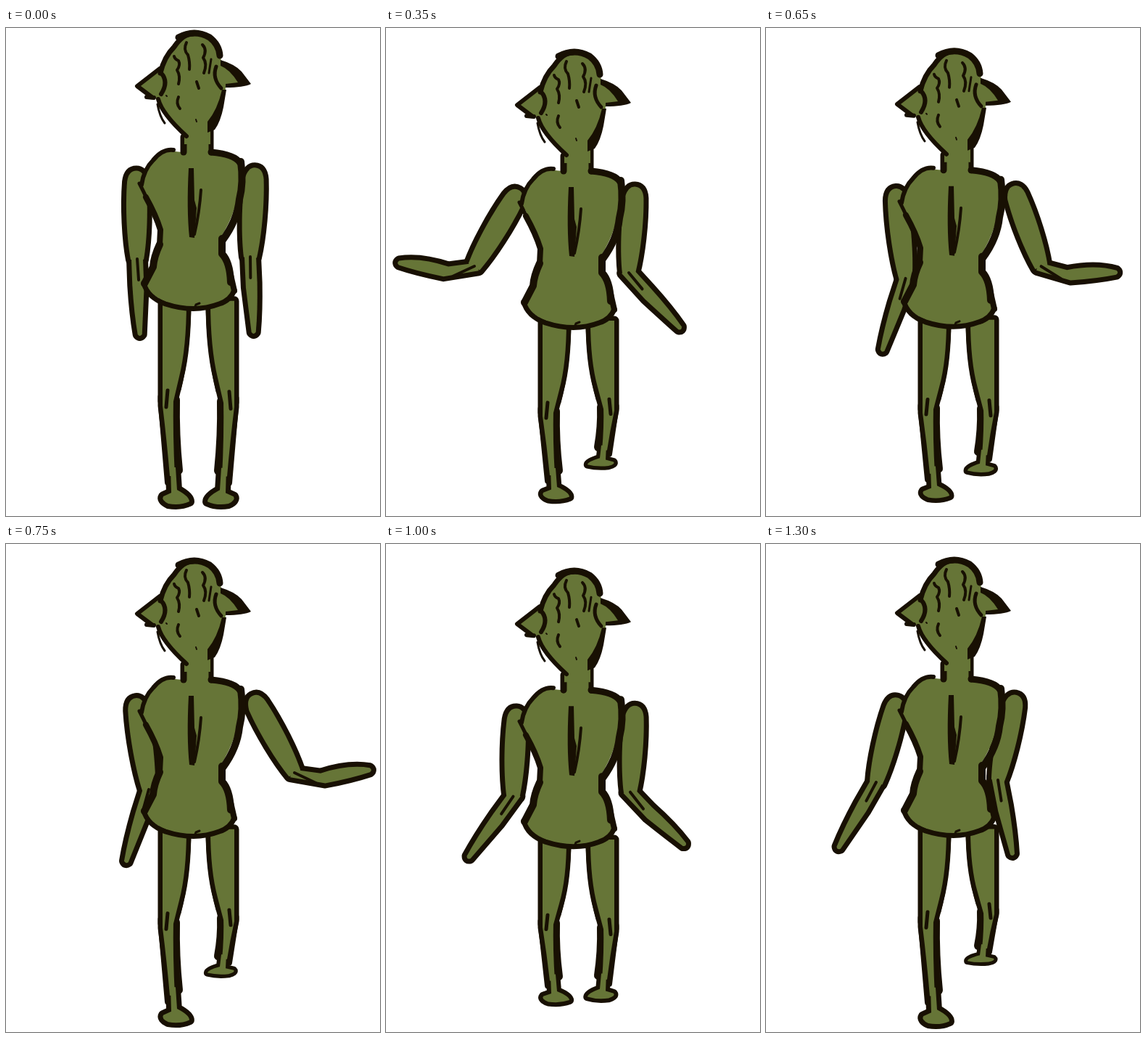
An HTML page with a canvas that plays this animation: 516 px wide and 672 px high, repeating every 1.35 s.

```html
<!DOCTYPE html>
<html lang="en">
<head>
<meta charset="utf-8">
<title>Walking goblin</title>
<style>
html, body { margin: 0; width: 100%; height: 100%; overflow: hidden; background: #fff; }
canvas { display: block; }
</style>
</head>
<body>
<canvas id="stage" width="516" height="672"></canvas>
<script>
const ctx = document.getElementById('stage').getContext('2d');
const SKIN = '#667537', INK = '#181003';
const LOOP = 1350, STEP = 50;

// time, body drop, left knee, left sole, right knee, right sole
const WALK = [
  [0, 0, 510, 662, 512, 662],
  [200, 26, 501, 636, 498, 585],
  [275, 22, 502, 646, 496, 572],
  [350, 26, 500, 628, 495, 581],
  [500, 38, 487, 596, 498, 607],
  [750, 16, 503, 649, 498, 580],
  [900, 24, 494, 624, 492, 581],
  [1030, 32, 489, 600, 498, 606],
  [1100, 23, 495, 607, 503, 607],
  [1300, 15, 502, 652, 490, 564]
];

// time, elbow x, y, hand x, y; the left arm is stored mirrored
const RIGHT_ARM = [
  [0, 337, 315, 342, 425],
  [200, 318, 312, 343, 420],
  [500, 352, 310, 453, 338],
  [750, 398, 299, 509, 295],
  [900, 358, 308, 456, 356],
  [1100, 316, 315, 363, 407],
  [1300, 320, 310, 341, 417]
];
const LEFT_ARM = [
  [0, 335, 318, 331, 430],
  [200, 353, 319, 408, 420],
  [350, 394, 302, 508, 297],
  [500, 330, 317, 365, 421],
  [750, 319, 322, 351, 424],
  [900, 331, 313, 387, 408],
  [1100, 350, 322, 424, 404],
  [1300, 364, 313, 421, 412]
];

const mix = (a, b, k) => a + (b - a) * k;
const clamp01 = v => Math.max(0, Math.min(1, v));

function sample(keys, t) {
  const i = keys.findIndex(k => k[0] > t);
  if (i < 0) return keys[keys.length - 1].slice(1);
  const a = keys[i - 1], b = keys[i];
  const k = (t - a[0]) / (b[0] - a[0]);
  return a.slice(1).map((v, n) => mix(v, b[n + 1], k));
}

function shape(d, matrix = new DOMMatrix()) {
  const p = new Path2D();
  p.addPath(new Path2D(d), matrix);
  return p;
}

function ink(path, width) {
  ctx.lineWidth = width;
  ctx.strokeStyle = INK;
  ctx.stroke(typeof path === 'string' ? new Path2D(path) : path);
}

function skin(path) {
  ctx.fillStyle = SKIN;
  ctx.fill(typeof path === 'string' ? new Path2D(path) : path);
}

function solid(d) {
  ctx.fillStyle = INK;
  ctx.fill(new Path2D(d));
}

function mirrored(width, draw) {
  ctx.save();
  ctx.translate(width, 0);
  ctx.scale(-1, 1);
  draw();
  ctx.restore();
}

// Limb matrix: x runs along the bone
function bone(x, y, angle, stretch = 1) {
  return new DOMMatrix().translate(x, y).rotate(angle * 180 / Math.PI).scale(stretch, 1);
}

function drawArm(sx, sy, [ex, ey, hx, hy]) {
  const dx = ex - sx, dy = ey - sy;
  const upper = shape(
    'M121 9C92 14 45 16 8 13Q-8 9-8 0Q-8-11 8-13C45-16 92-14 121-9Z',
    bone(sx, sy, Math.atan2(dy, dx), Math.hypot(dx, dy) / 120));

  const angle = Math.atan2(hy - ey, hx - ex);
  const lift = 90 - angle * 180 / Math.PI;
  const bend = clamp01((lift - 42) / 18);
  const low = mix(8, 16, bend), top = mix(-8, 2, bend);
  const m = bone(ex, ey, angle);
  const fore = shape(
    `M-6 ${mix(8, 6, bend)}L42 ${low}Q80 ${mix(5, 10, bend)} 104 3Q108 0 104-3` +
    `Q75 ${mix(-7, -9, bend)} 36 ${top}L-4 ${mix(-8, -5, bend)}Z`, m);

  ink(upper, 14);
  ink(fore, 14);
  skin(upper);
  skin(fore);
  ink(shape(`M0 0L29 ${mix(1, 15, bend)}`, m), 4);
}

// Thigh and shank foreshorten separately
function drawLeg(knee, sole) {
  const HIP = 385, KNEE = 510;
  const kt = (knee - HIP) / (KNEE - HIP), ks = (sole - knee) / 152;
  const thighM = new DOMMatrix([1, 0, 0, kt, 0, HIP * (1 - kt)]);
  const shankM = new DOMMatrix([1, 0, 0, ks, 0, knee - KNEE * ks]);

  const thigh = shape('M216 376L249 376Q249 440 239 480L231 514L216 514Z', thighM);
  const shank = shape('M216 508L231 508Q230 560 233 617L226 617Q222 570 216 520Z', shankM);
  const foot = shape('M227 605L234 605L236 636Q253 645 253 652Q240 658 224 655Q214 650 217 645L228 640Z', shankM);

  ink(foot, 14 * Math.sqrt(ks));
  ink(thigh, 13);
  ink(shape('M251 385Q249 450 237 498', thighM), 9);
  ink(shank, 13);
  ink(shape('M234 512Q233 560 238 609', shankM), 12);
  ink(shape('M214 520L223 626', shankM), 8);
  skin(thigh);
  skin(shank);
  skin(foot);
  ink(shape('M223 499L221 522', thighM), 5);
}

function drawTorso() {
  skin('M243 150L243 171L224 169Q188 182 187 215Q206 250 215 283Q214 306 194 355' +
    'Q200 376 258 387Q300 385 315 364Q314 336 297 310L295 290Q322 250 325 195' +
    'Q320 178 284 171L282 138Z');
  ink('M231 168Q216 166 203 182Q190 195 187 216', 6);
  ink('M184 214Q196 237 212 275', 5);
  ink('M193 233Q207 258 213 278L212 298', 8);
  ink('M212 298Q204 315 203 329L191 352', 10);
  ink('M190 351Q195 371 220 380Q260 393 294 380Q310 375 315 361', 7);
  ink('M283 171Q316 174 323 186', 9);
  ink('M324 184Q328 213 322 236Q319 265 299 292', 10);
  ink('M298 290L298 311Q309 322 310 350', 10);
  ink('M310 340L315 362', 8);
  ink('M245 150L245 171', 9);
  ink('M283 140L283 172', 7);
  solid('M252 193L259 193L260 237L263 248L260 289L253 288Q249 250 252 193Z');
  ink('M269 223Q267 253 260 284', 4);
  ink('M260 386L262 381L267 379', 3);
}

function drawHead() {
  skin('M216 55Q231 6 259 6Q294 7 297 47Q322 55 334 77L303 82Q300 125 282 142' +
    'L282 160L246 160L246 147Q219 127 208 97L181 80Z');
  ink('M213 62Q218 40 232 26Q244 8 258 8', 7);
  ink('M238 13Q260 1 281 13Q294 23 295 38', 9);
  ink('M212 56L181 80L201 95', 6);
  ink('M194 95L204 96', 6);
  solid('M296 44Q316 50 325 60L338 77Q328 82 303 82L303 77L320 75Q309 57 296 52Z');
  ink('M214 62Q225 74 214 91', 6);
  ink('M290 53Q284 69 297 83', 5);
  ink('M283 43L280 62', 3);
  ink('M232 39Q233 43 238 45Q241 51 236 58Q241 66 238 77', 4);
  ink('M249 20Q244 30 251 37Q254 47 253 57', 4);
  ink('M271 23Q278 30 272 41Q278 49 273 62', 4);
  ink('M263 74L266 83M238 95Q234 104 240 111', 4);
  ink('M262 126L263 129M221 93L222 94', 2);
  ink('M210 98Q215 118 249 149', 6);
  ink('M209 105Q212 122 219 131', 3);
  solid('M298 85L304 85L300 109Q296 129 288 140L278 144L278 129Q292 112 298 85Z');
}

function render(t) {
  const [drop, leftKnee, leftSole, rightKnee, rightSole] = sample(WALK, t);
  ctx.fillStyle = '#fff';
  ctx.fillRect(0, 0, 516, 672);
  ctx.save();
  ctx.translate(0, drop);
  mirrored(516, () => drawArm(336, 204, sample(LEFT_ARM, t)));
  drawArm(343, 200, sample(RIGHT_ARM, t));
  drawLeg(leftKnee, leftSole);
  mirrored(531, () => drawLeg(rightKnee, rightSole));
  drawTorso();
  drawHead();
  ctx.restore();
}

ctx.lineCap = ctx.lineJoin = 'round';
const start = performance.now();

function tick() {
  const t = (performance.now() - start) % LOOP;
  render(Math.floor(t / STEP) * STEP);
  requestAnimationFrame(tick);
}
tick();
</script>
</body>
</html>
```
